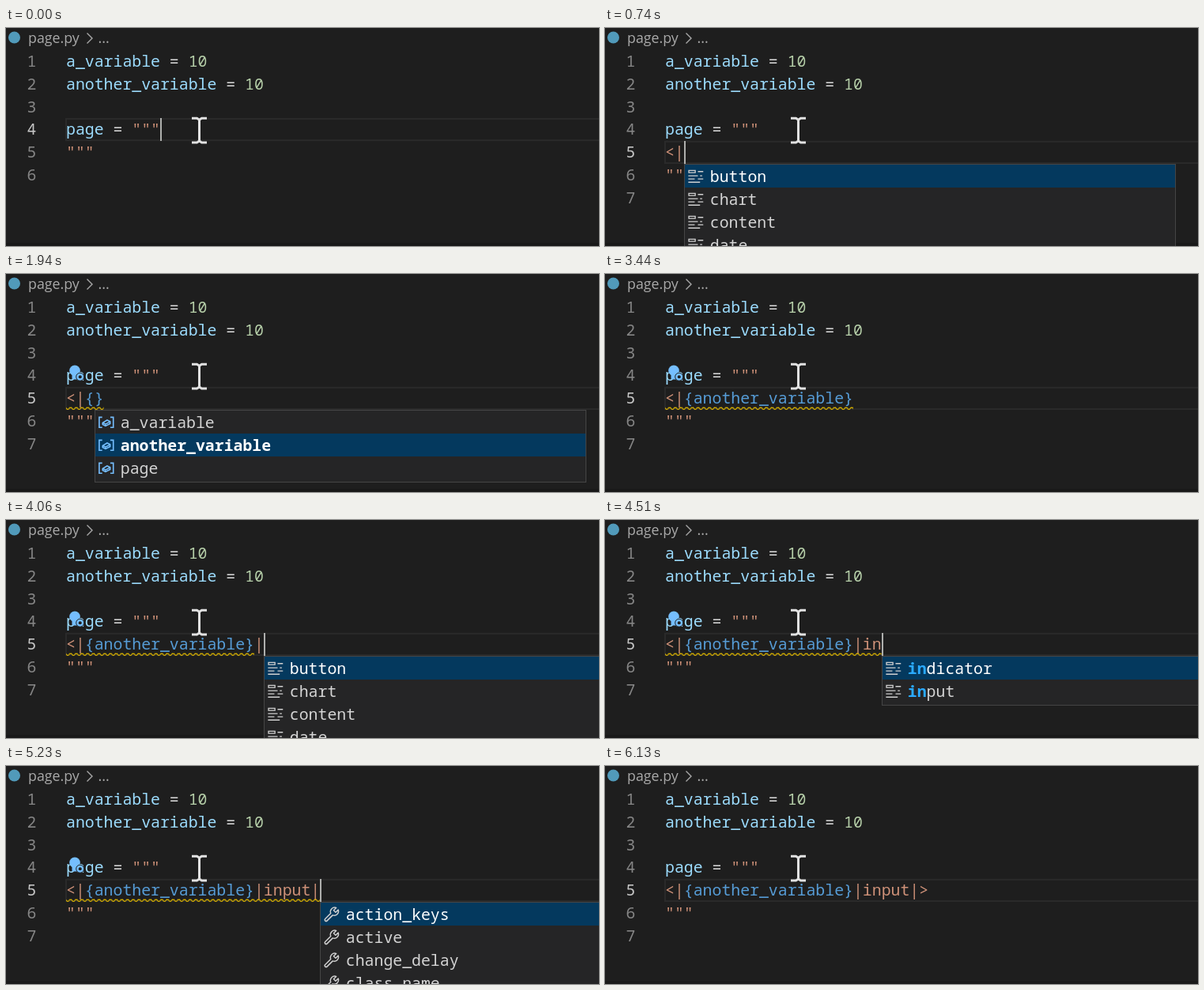
These frames come from a looping animation (750x276 px, 8130 ms). An HTML page:

```html
<!DOCTYPE html>
<html lang="en">
<head>
<meta charset="utf-8">
<title>Editor completion</title>
<style>
  html, body { margin: 0; width: 100%; height: 100%; overflow: hidden; background: #1e1e1e; }
  svg { display: block; width: 750px; height: 276px; }
  text { font: 500 19.83px "Noto Sans Mono", "DejaVu Sans Mono", monospace; white-space: pre; fill: #d4d4d4; }
  .crumb { font: 17.8px "Open Sans", "Noto Sans", sans-serif; fill: #a9a9a9; }
  .num { fill: #858585; }
  .num.on { fill: #c6c6c6; }
  .var { fill: #9cdcfe; }
  .lit { fill: #b5cea8; }
  .str { fill: #ce9178; }
  .expr { fill: #569cd6; }
  .sel { fill: #fff; }
  .heavy { font-weight: 600; }
  .hit { fill: #2aaaff; font-weight: 700; }
</style>
</head>
<body>
<svg viewBox="0 0 750 276">
  <defs>
    <pattern id="wave" x="76" y="168" width="7.2" height="4" patternUnits="userSpaceOnUse">
      <path transform="scale(1.2 1.333)" fill="#cca700"
        d="M5.5 0L2.5 3H1.1L4.1 0ZM4 0L6 2V.6L5.4 0ZM0 2L1 3H2.4L0 .6Z"/>
    </pattern>
    <g id="variable" fill="none" stroke="#75beff" stroke-width="1.2">
      <path d="M4.2 3.2H1.4v9.6h2.8M11.8 3.2h2.8v9.6h-2.8"/>
      <path d="M4.6 8.4L8.8 5.9l2.8 1.4v1.9L7.3 11.4 4.6 10ZM4.6 8.4l2.7 1.3 4.3-2.4M7.3 9.7v1.7"/>
    </g>
    <path id="control" fill="#d0d0d0" fill-rule="evenodd"
      d="M15 4h-5V3h5zM14 7h-2v1h2zM10 7H1v1h9zM12 13H1v1h11zM7 10H1v1h6zM15 10h-5v1h5zM8 2v3H1V2zM7 3H2v1h5z"/>
    <path id="property" fill="none" stroke="#d0d0d0" stroke-width="1.1" stroke-linejoin="round"
      d="M2 12.2L7.2 7A4 4 0 0 1 12.3 1.8L9.9 4.2 11.8 6.1 14.2 3.7A4 4 0 0 1 9 8.8L3.8 14A1.25 1.25 0 0 1 2 12.2Z"/>
  </defs>

  <rect width="750" height="276" fill="#1e1e1e"/>
  <rect y="272" width="750" height="4" fill="#191919"/>
  <circle cx="10.5" cy="12" r="7.5" fill="#519aba"/>
  <text class="crumb" x="28" y="19">page.py</text>
  <path d="M102.5 6.5l6.5 6.5-6.5 6.5" fill="none" stroke="#a9a9a9" stroke-width="1.4"/>
  <text class="crumb" x="116.5" y="19">...</text>

  <g id="editor"></g>

  <path fill="none" stroke="#e2e2e2" stroke-width="3"
    d="M235 114.2h6.5l3 2 3-2h6.5M244.5 115.5V143.5M235 145h6.5l3-2 3 2h6.5"/>
</svg>
<script>
const LOOP = 8130, X0 = 76, ADV = 11.9, LINE = 28.8, ROW = 29;
const colX = col => X0 + col * ADV;
const lineY = line => 28.2 + (line - 1) * LINE;

const LISTS = {
  names:   { icon: 'variable', items: ['a_variable', 'another_variable', 'page'], heavy: true },
  all:     { icon: 'control',  items: ['button', 'chart', 'content', 'date'] },
  i:       { icon: 'control',  items: ['image', 'indicator', 'input'], hit: 1 },
  in:      { icon: 'control',  items: ['indicator', 'input'], hit: 2 },
  options: { icon: 'property', items: ['action_keys', 'active', 'change_delay', 'class_name'] }
};

const EXPR = '<|{another_variable}';
const OFF = -1;
// time, typed line (null before it exists), caret column, squiggle end, list, selected row, bulb
const STEPS = [
  [0,    null, 10],
  [300,  null, OFF],
  [550,  '', 0],
  [630,  '<', 1],
  [710,  '<|', 2, 0, 'all', 0],
  [780,  '<|{}', 3],
  [860,  '<|{}', 3, 4],
  [940,  '<|{}', 3, 4, 'names', 0],
  [1940, '<|{}', OFF, 4, 'names', 1, true],
  [2440, EXPR, 19, 20, '', 0, true],
  [3440, EXPR, OFF, 20, '', 0, true],
  [3690, EXPR, 19, 20, '', 0, true],
  [3940, EXPR, 20, 20, '', 0, true],
  [4060, EXPR + '|', 21, 20, 'all', 0, true],
  [4210, EXPR + '|i', 22, 21, 'i', 0, true],
  [4360, EXPR + '|i', 22, 22, 'i', 0, true],
  [4510, EXPR + '|in', 23, 23, 'in', 0, true],
  [4660, EXPR + '|in', OFF, 23, 'in', 1, true],
  [4810, EXPR + '|input', 26, 23, '', 0, true],
  [5110, EXPR + '|input', 26, 26, '', 0, true],
  [5230, EXPR + '|input|', 27, 27, 'options', 0, true],
  [5430, EXPR + '|input|>', 28, 27, '', 0, true],
  [5630, EXPR + '|input|>', 28, 0, '', 0, true],
  [6130, EXPR + '|input|>', OFF]
];

const esc = s => s.replace(/&/g, '&amp;').replace(/</g, '&lt;').replace(/>/g, '&gt;');
const span = (cls, s) => `<tspan class="${cls}">${esc(s)}</tspan>`;
const text = (x, y, body, cls = '') => `<text class="${cls}" x="${x}" y="${y}">${body}</text>`;
const rect = (x, y, w, h, fill, more = '') =>
  `<rect x="${x}" y="${y}" width="${w}" height="${h}" fill="${fill}" ${more}/>`;

const assign = (name, value) => span('var', name) + ' = ' + value;
const typed = s => s.split(/(\{.*\})/).map(p => span(p[0] === '{' ? 'expr' : 'str', p)).join('');

function bulb() {
  return `<g fill="#75beff"><circle cx="87" cy="122.3" r="6.8"/>
    <path d="M83.5 127h7v5q0 1.5-1.5 1.5h-4q-1.5 0-1.5-1.5z"/>
    <circle cx="93.7" cy="130.2" r="5" stroke="#1e1e1e" stroke-width="1"/></g>
    <circle cx="93.7" cy="130.2" r="2" fill="#1e1e1e"/>`;
}

function popup(name, col, sel) {
  const { icon, items, hit = 0, heavy } = LISTS[name];
  const x = Math.round(colX(col)), top = 172;
  const rows = items.map((item, i) => {
    const y = top + 1 + i * ROW, on = i === sel;
    const cls = on ? (heavy ? 'sel heavy' : 'sel') : '';
    const label = (hit ? span('hit', item.slice(0, hit)) : '') + esc(item.slice(hit));
    return (on ? rect(x + 1, y, 620, ROW, '#04395e') : '') +
      `<use href="#${icon}" transform="translate(${x + 4} ${y + 4}) scale(1.35)"/>` +
      text(x + 32.8, y + 22, label, cls);
  });
  return rect(x + 0.5, top + 0.5, 621, items.length * ROW + 4, '#252526', 'stroke="#454545"') +
    rows.join('');
}

function draw([, line, caret, wave = 0, list, sel, lit]) {
  const quotes = span('str', '"""');
  const lines = [
    assign('a_variable', span('lit', '10')),
    assign('another_variable', span('lit', '10')),
    '',
    assign('page', quotes)
  ];
  if (line !== null) lines.push(typed(line));
  lines.push(quotes, '');

  const active = line === null ? 4 : 5, top = lineY(active);
  let out = rect(X0, top + 0.4, 690, LINE - 1.6, 'none', 'stroke="#2a2a2a" stroke-width="2"');
  lines.forEach((body, i) => {
    const y = Math.round(lineY(i + 1) + 20.8);
    out += text(26.6, y, i + 1, i + 1 === active ? 'num on' : 'num') + text(X0, y, body);
  });
  if (wave) out += rect(X0, 168, wave * ADV, 4, 'url(#wave)');
  if (lit) out += bulb();
  if (list) out += popup(list, caret === OFF ? line.replace(/\}$/, '').length : caret, sel);
  if (caret !== OFF) out += rect(Math.round(colX(caret)), 114 + (active - 4) * 29, 2, 29, '#aeafad');
  return out;
}

const editor = document.getElementById('editor');
const start = performance.now();
let shown = null;

function tick() {
  const t = (performance.now() - start) % LOOP;
  const step = STEPS.filter(s => s[0] <= t).pop();
  if (step !== shown) {
    shown = step;
    editor.innerHTML = draw(step);
  }
  requestAnimationFrame(tick);
}
tick();
</script>
</body>
</html>
```
